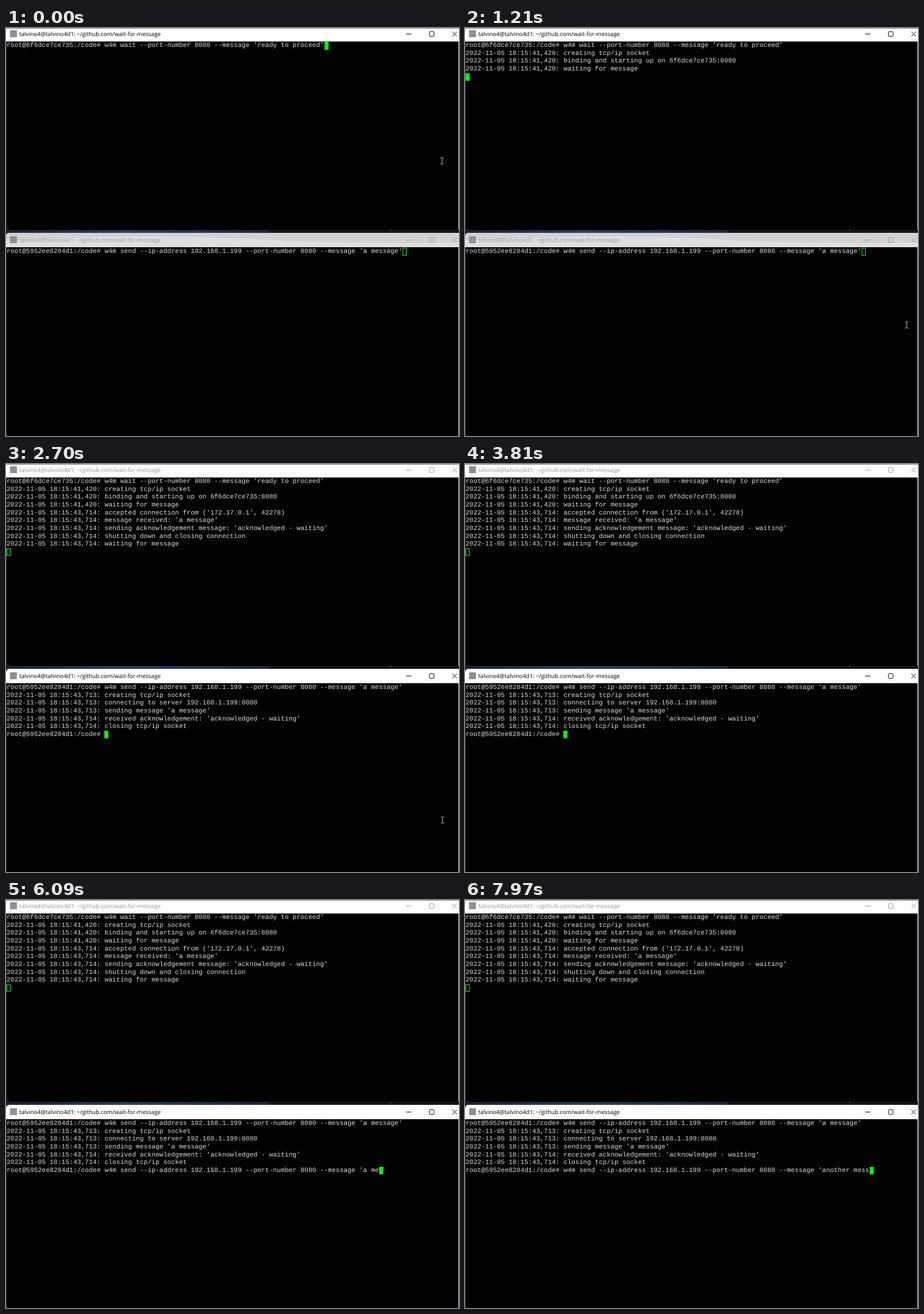
These frames come from a looping animation (788x711 px, 8 s). An HTML page:

```html
<!DOCTYPE html>
<html lang="en">
<head>
<meta charset="utf-8">
<title>Waiting for a message</title>
<style>
html, body { margin: 0; width: 100%; height: 100%; overflow: hidden; background: #000; }
body { position: relative; text-rendering: geometricPrecision; }
svg, pre, i { position: absolute; left: 0; top: 0; }
pre { left: 1px; margin: 0; color: #dcdcdc; font: 11.375px/13.65px "Liberation Mono", monospace; }
i { box-sizing: border-box; width: 7px; height: 13.5px; border: 1px solid #0f0; }
.active i { background: #0f0; }
svg text { font: 10px "Open Sans", sans-serif; }
.bar { color: #999; }
.active .bar { color: #000; }
.bar text { fill: currentColor; }
.bar path { fill: none; stroke: currentColor; }
.bar .icon { fill: #8d8f9b; }
.active .haze { display: none; }
</style>
</head>
<body>
<svg width="788" height="711">
  <defs>
    <linearGradient id="sky">
      <stop stop-color="#182238"/><stop offset=".45" stop-color="#2a3d5f"/><stop offset="1" stop-color="#1b2740"/>
    </linearGradient>
  </defs>
  <path d="M0 350H458V358H0Z" fill="url(#sky)"/>
  <path d="M458 350H788V358H458Z" fill="#141414"/>
  <path d="M668 352h2v1h-2z" fill="#999"/>
  <path d="M0 20H788V352H5Q0 352 0 347Z"/>
  <path d="M0 380H788V711H0Z"/>
  <path d="M.5 23V347Q.5 351.5 5 351.5M.5 382V711" fill="none" stroke="#484848"/>
  <path d="M787.5 23V352M787.5 382V711" stroke="#dcdcdc"/>
</svg>
<div id="top"><pre></pre><i></i></div>
<div id="bottom"><pre></pre><i></i></div>
<svg width="788" height="711">
  <path id="beam" d="M-3 -5.5H-1L0 -4.5L1 -5.5H3M0 -4.5V4.5M-3 5.5H-1L0 4.5L1 5.5H3" fill="none" stroke="#c4c4c4"/>
</svg>
<script>
const LOOP = 8000, CELL = 6.825, ROW = 13.65;
const $ = id => document.getElementById(id);

const log = (ms, text) => `2022-11-05 18:15:${ms}: ${text}\n`;
const waitCmd = "root@6f6dce7ce735:/code# w4m wait --port-number 8080 --message 'ready to proceed'";
const prompt = "root@5952ee8284d1:/code# ";
const sendCmd = "w4m send --ip-address 192.168.1.199 --port-number 8080 --message '";
const first = "a message'", second = "another message'";

const listening = log("41,420", "creating tcp/ip socket")
  + log("41,420", "binding and starting up on 6f6dce7ce735:8080")
  + log("41,420", "waiting for message");
const received = log("43,714", "accepted connection from ('172.17.0.1', 42278)")
  + log("43,714", "message received: 'a message'")
  + log("43,714", "sending acknowledgement message: 'acknowledged - waiting'")
  + log("43,714", "shutting down and closing connection")
  + log("43,714", "waiting for message");
const sent = log("43,713", "creating tcp/ip socket")
  + log("43,713", "connecting to server 192.168.1.199:8080")
  + log("43,713", "sending message 'a message'")
  + log("43,714", "received acknowledgement: 'acknowledged - waiting'")
  + log("43,714", "closing tcp/ip socket");

// Key presses: backspaces, then letters of the second message
const erase = [5200, 5560, 5660, 5760, 5870, 5980, 6210, 6320, 6460];
const type = [6750, 6900, 7080, 7300, 7380, 7460, 7560, 7650, 7760, 7870, 7960];

// Pointer stops: time, x, y
const pointer = [
  [0, 758, 231], [600, 758, 231], [800, 764, 300], [950, 768, 385], [1150, 769, 492],
  [1210, 768, 516], [1330, 764, 577], [1460, 760, 618], [1540, 760, 620], [2050, 760, 620],
  [2170, 759, 620], [2760, 759, 620], [3000, 766, 660], [3130, 774, 697], [3250, 775, 725]
];

function addTitleBar(id, y, h, mid) {
  const bottom = y + h;
  const box = y ? `M0 ${bottom}V${y + 6}Q0 ${y} 6 ${y}H788V${bottom}Z` : `M0 0H788V${h}H0Z`;
  const fill = (d, color) => `<path d="${d}" style="fill:${color};stroke:none"/>`;
  const wave = `M0 ${y + 14}C200 ${y + 3} 330 ${y + 6} 450 ${y + 12}S680 ${y + 19} 788 ${y + 17}V${bottom}H0Z`;
  const detail = y ? `<g class="haze">${fill(box, "#d2d2d2")}${fill(wave, "#dedfde")}</g>`
    : `<path d="M0 .5H788" style="stroke:#777"/>`;
  $(id).insertAdjacentHTML("afterbegin", `<svg class="bar" width="788" height="711">
    ${fill(box, "#fff")}${detail}
    <rect class="icon" x="7" y="${mid - 6.5}" width="12" height="12"/>
    <text x="23" y="${mid + 3.8}">talvino4@talvino4d1:</text>
    <text x="123" y="${mid + 3.8}">~/github.com/wait-for-message</text>
    <path d="M696 ${mid}h9M737.5 ${mid - 4}h6q1 0 1 1v6q0 1 -1 1h-6q-1 0 -1 -1v-6q0 -1 1 -1zM776.5 ${mid - 4}l8 8m0 -8l-8 8"/>
  </svg>`);
}

function show(id, text, y, active) {
  const win = $(id), pre = win.querySelector("pre"), cursor = win.querySelector("i");
  const lines = text.split("\n");
  if (pre.textContent != text) pre.textContent = text;
  pre.style.top = y + 1 + "px";
  cursor.style.left = 1 + lines.at(-1).length * CELL - .3 + "px";
  cursor.style.top = y + (lines.length - 1) * ROW + "px";
  win.className = active ? "active" : "";
}

function topText(t) {
  return waitCmd + (t >= 350 ? "\n" : "") + (t >= 400 ? listening : "") + (t >= 2680 ? received : "");
}

function bottomText(t) {
  let text = prompt + sendCmd + first;
  if (t >= 2570) text += "\n";
  if (t >= 2680) text += sent + prompt;
  if (t < 4350) return text;
  const gone = erase.filter(k => k <= t).length, typed = type.filter(k => k <= t).length;
  return text + sendCmd + (typed ? second.slice(0, typed + 1) : first.slice(0, first.length - gone));
}

function movePointer(t) {
  const n = pointer.findIndex(p => p[0] > t);
  const [t0, x0, y0] = pointer.at(n < 0 ? -1 : n - 1), [t1, x1, y1] = pointer.at(n);
  const k = n < 0 ? 0 : (t - t0) / (t1 - t0);
  const x = Math.round(x0 + (x1 - x0) * k), y = Math.round(y0 + (y1 - y0) * k);
  $("beam").setAttribute("transform", `translate(${x + .5} ${y + .5})`);
  $("beam").style.display = y > 346 && y < 388 ? "none" : "";
}

function draw(now) {
  const t = now % LOOP, switched = t >= 1560;
  show("top", topText(t), 24, !switched);
  show("bottom", bottomText(t), 383, switched);
  movePointer(t);
}

addTitleBar("top", 0, 23.5, 10.5);
addTitleBar("bottom", 357, 25, 369.5);
const start = performance.now();
function tick(now) {
  draw(Math.max(0, now - start));
  requestAnimationFrame(tick);
}
tick(start);
</script>
</body>
</html>
```
